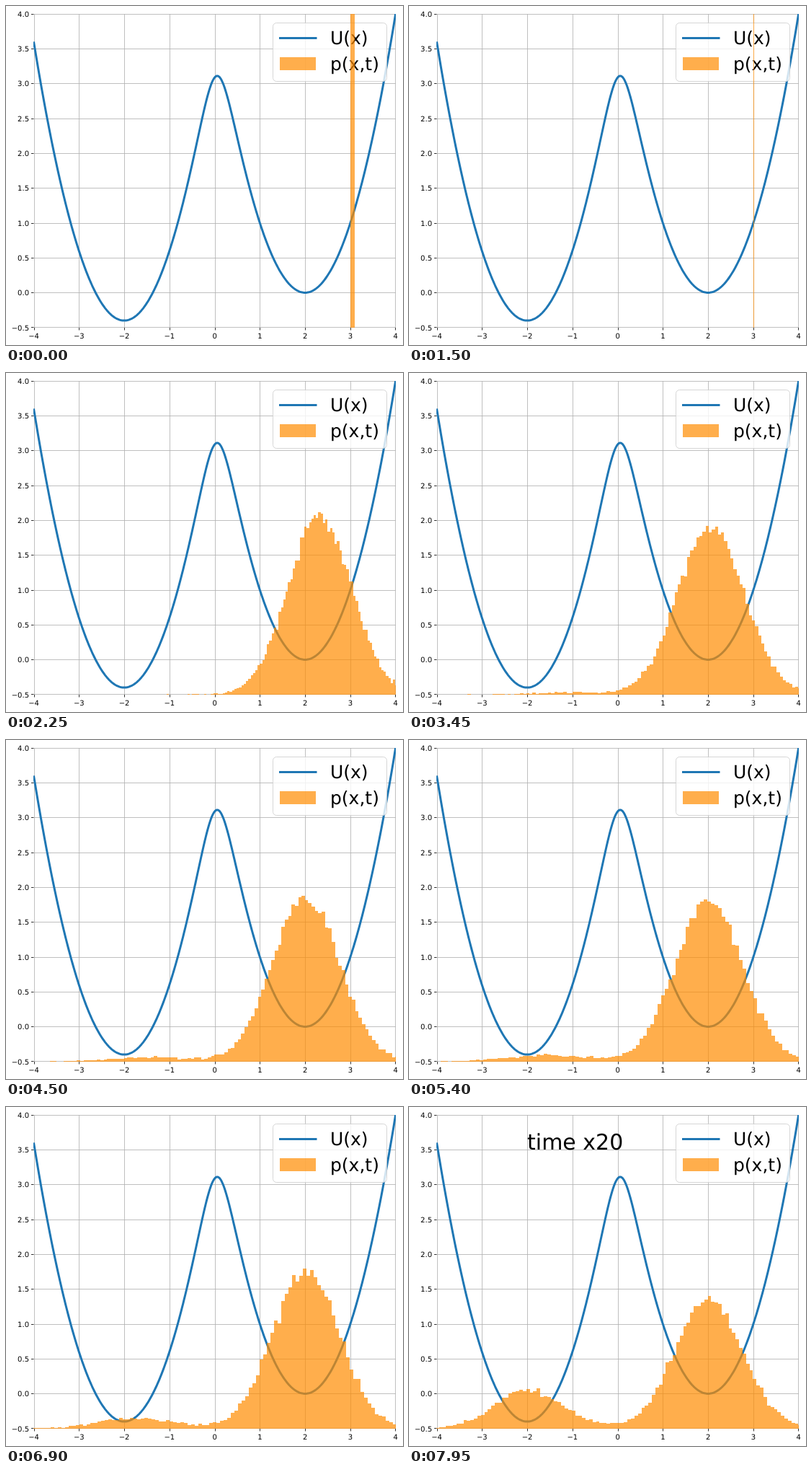
Write an HTML page with a canvas that moves like this. It is 551 by 470 pixels and loops after 8000 ms.

```html
<!DOCTYPE html>
<html lang="en">
<head>
<meta charset="utf-8">
<style>
  html, body { margin: 0; width: 100%; height: 100%; overflow: hidden; background: #fff; }
  canvas { display: block; }
</style>
</head>
<body>
<canvas id="stage" width="551" height="470"></canvas>
<script>
const ctx = document.getElementById('stage').getContext('2d');
const BLUE = '#1f77b4', ORANGE = 'rgba(255,140,0,0.7)';
const LOOP = 8000, HOLD = 1500, STEP = 150, LAST = 44, FAST_FROM = 41;

const px = x => 289.6 + 62.775 * x;
const py = y => 397.45 - 96.65 * y;
const U = x => -Math.log(Math.exp(-((x - 2) ** 2)) + Math.exp(0.4 - (x + 2) ** 2));
const slope = x => 2 * (x - 2 + 4 / (1 + Math.exp(8 * x - 0.4)));

let seed = 12345;
function random() {
  seed = (Math.imul(seed, 1664525) + 1013904223) >>> 0;
  return (seed + 0.5) / 4294967296;
}
const gauss = () => Math.sqrt(-2 * Math.log(random())) * Math.cos(2 * Math.PI * random());

// Brownian particles in U(x), all released at x = 3
const DT = 0.1, KICK = Math.sqrt(2 * DT);
const particles = new Float64Array(50000).fill(3);

function move(times) {
  while (times--) {
    for (let i = 0; i < particles.length; i++) {
      particles[i] += KICK * gauss() - DT * slope(particles[i]);
    }
  }
}

const AREA = 4.5;
function histogram(bins) {
  let lo = Infinity, hi = -Infinity;
  for (const x of particles) {
    lo = Math.min(lo, x);
    hi = Math.max(hi, x);
  }
  if (lo === hi) {
    lo -= 0.5;
    hi += 0.5;
  }
  const w = (hi - lo) / bins;
  const counts = new Array(bins).fill(0);
  for (const x of particles) counts[Math.min(bins - 1, Math.floor((x - lo) / w))]++;
  return counts.map((count, i) => {
    const x = Math.round(px(lo + i * w));
    const y = Math.round(py(count * AREA / (particles.length * w) - 0.5));
    return [x, y, Math.max(1, Math.round(px(lo + (i + 1) * w)) - x), 446 - y];
  });
}

const steps = [histogram(10)];
for (let n = 1; n <= LAST; n++) {
  if (n > 1) move(n < FAST_FROM ? 1 : 20);
  steps.push(histogram(128));
}

function line(x1, y1, x2, y2, color, width) {
  ctx.strokeStyle = color;
  ctx.lineWidth = width;
  ctx.beginPath();
  ctx.moveTo(x1, y1);
  ctx.lineTo(x2, y2);
  ctx.stroke();
}

function text(str, x, y, size, align = 'left') {
  ctx.font = size + 'px "DejaVu Sans", sans-serif';
  ctx.textRendering = 'geometricPrecision';
  ctx.textAlign = align;
  ctx.fillStyle = '#000';
  ctx.fillText(str, x, y);
}

const label = (v, digits) => (v < 0 ? '\u2212' : '') + Math.abs(v).toFixed(digits);
const crisp = (v, max) => Math.min(max, Math.round(v)) + 0.5;

function clipPlot() {
  ctx.save();
  ctx.beginPath();
  ctx.rect(38, 11, 503, 435);
  ctx.clip();
}

function drawAxes() {
  for (let v = -4; v <= 4; v++) {
    const x = crisp(px(v), 540);
    line(x, 11, x, 446, '#b0b0b0', 0.8);
    line(x, 446, x, 449.5, '#000', 0.8);
    text(label(v, 0), px(v), 461, 10, 'center');
  }
  for (let v = -0.5; v <= 4; v += 0.5) {
    const y = crisp(py(v), 445);
    line(38.5, y, 541, y, '#b0b0b0', 0.8);
    line(35, y, 38.5, y, '#000', 0.8);
    text(label(v, 1), 32, Math.round(py(v) + 3.8), 10, 'right');
  }
}

function drawCurve() {
  clipPlot();
  ctx.strokeStyle = BLUE;
  ctx.lineWidth = 3;
  ctx.lineJoin = 'round';
  ctx.beginPath();
  for (let x = -4; x <= 4.001; x += 0.02) ctx.lineTo(px(x), py(U(x)));
  ctx.stroke();
  ctx.restore();
}

function drawLegend() {
  ctx.beginPath();
  ctx.roundRect(370.5, 23.5, 158, 81, 5);
  ctx.fillStyle = 'rgba(255,255,255,0.8)';
  ctx.fill();
  ctx.strokeStyle = 'rgba(204,204,204,0.8)';
  ctx.lineWidth = 1;
  ctx.stroke();
  line(379, 44.5, 431.5, 44.5, BLUE, 3);
  ctx.fillStyle = ORANGE;
  ctx.fillRect(380, 71, 50, 18);
  text('U(x)', 450, 53, 25);
  text('p(x,t)', 450, 89, 25);
}

function drawBars(bars) {
  clipPlot();
  ctx.fillStyle = ORANGE;
  ctx.beginPath();
  for (const bar of bars) ctx.rect(...bar);
  ctx.fill();
  ctx.restore();
}

function draw(now) {
  const t = now % LOOP;
  const n = t < HOLD ? 0 : Math.min(LAST, 1 + Math.floor((t - HOLD) / STEP));
  ctx.fillStyle = '#fff';
  ctx.fillRect(0, 0, 551, 470);
  drawAxes();
  drawCurve();
  drawLegend();
  if (n >= FAST_FROM) text('time x20', px(-2), Math.round(py(3.5)), 30);
  drawBars(steps[n]);
}

let start;
function tick(now) {
  start ??= now;
  draw(now - start);
  requestAnimationFrame(tick);
}
requestAnimationFrame(tick);
</script>
</body>
</html>
```
